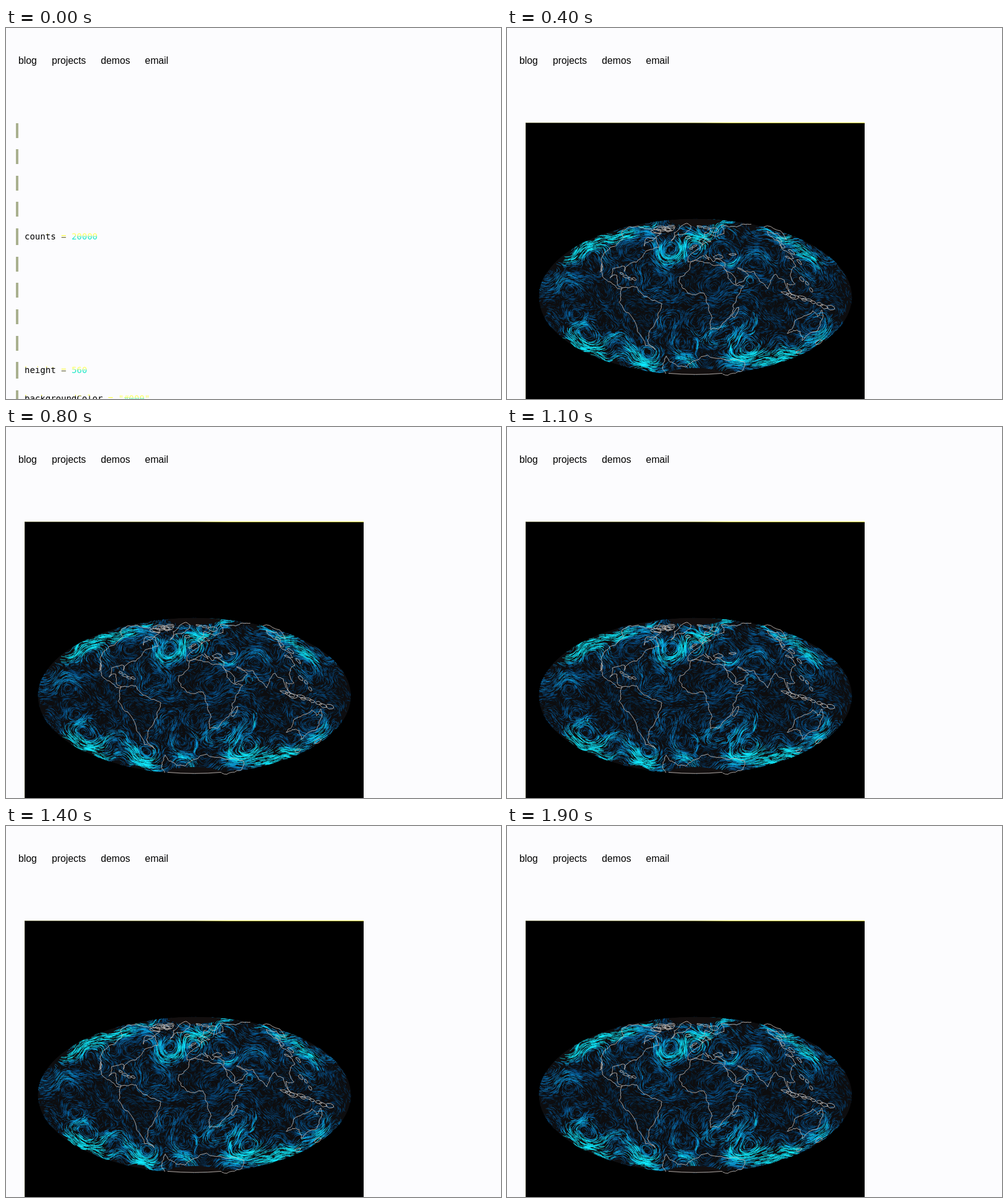
An HTML page with a canvas that plays this animation: 800x600 px, repeating every 2 s.

```html
<!DOCTYPE html>
<html lang="en">
<head>
<meta charset="utf-8">
<title>Wind map</title>
<style>
  html, body { margin: 0; width: 100%; height: 100%; overflow: hidden; background: #fcfcfe; }
  nav { position: absolute; left: 20px; top: 43px; display: flex; gap: 24px;
    font: 15.8px/20px "Liberation Sans", Arial, sans-serif; color: #000; }
  canvas { position: absolute; left: 0; top: 0; }
  .cell { position: absolute; left: 16px; height: 24px; border-left: 4px solid #a9b08f; padding-left: 10px;
    font: 14px/27px "DejaVu Sans Mono", monospace; white-space: pre; }
  .cell.value { height: 27px; }
  .cell span { display: inline-block; height: 27px; color: transparent; background-clip: text; -webkit-background-clip: text; }
  .key { background-image: linear-gradient(#ffff50 8px, #000 10px); }
  .sign { background-image: linear-gradient(#ffff40 13px, #44443a 15px); }
  .literal { background-image: linear-gradient(#ffff60 11px, #20e8c8 14px); }
</style>
</head>
<body>
<nav><span>blog</span><span>projects</span><span>demos</span><span>email</span></nav>
<canvas id="map" width="800" height="600"></canvas>
<div id="cells"></div>
<script>
const LOOP = 2000, STEP = 100;
const CX = 304.5, CY = 435, RX = 253, RY = 126.3, SCALE = RX / Math.sqrt(8);
const canvas = document.getElementById('map');
const ctx = canvas.getContext('2d');
const cells = document.getElementById('cells');

// Notebook cells
const values = { 4: ['counts', '20000'], 9: ['height', '560'], 10: ['backgroundColor', '"#000"'] };
let cellTop = 154;
for (let i = 0; i < 11; i++) {
  const cell = document.createElement('div');
  cell.className = 'cell';
  cell.style.top = Math.floor(cellTop) + 'px';
  cellTop += 42.6;
  if (values[i]) {
    const [key, literal] = values[i];
    cell.classList.add('value');
    cell.innerHTML = `<span class="key">${key}</span><span class="sign"> = </span><span class="literal">${literal}</span>`;
    cellTop += 3.2;
  }
  cells.append(cell);
}

let seed = 7;
function random() {
  seed = (seed + 0x6d2b79f5) | 0;
  let t = Math.imul(seed ^ (seed >>> 15), 1 | seed);
  t = (t + Math.imul(t ^ (t >>> 7), 61 | t)) ^ t;
  return ((t ^ (t >>> 14)) >>> 0) / 4294967296;
}

// Hammer projection
function project(lon, lat) {
  const l = lon * Math.PI / 360, p = lat * Math.PI / 180;
  const z = Math.sqrt(1 + Math.cos(p) * Math.cos(l));
  return [CX + SCALE * Math.sqrt(8) * Math.cos(p) * Math.sin(l) / z,
          CY - SCALE * Math.SQRT2 * Math.sin(p) / z];
}

// Line with a crinkled, coast-like course
function roughLine(path, [x1, y1], [x2, y2], depth = 3) {
  if (!depth || Math.hypot(x2 - x1, y2 - y1) < 3) return path.lineTo(x2, y2);
  const bend = (random() - 0.5) * 0.34;
  const middle = [(x1 + x2) / 2 - (y2 - y1) * bend, (y1 + y2) / 2 + (x2 - x1) * bend];
  roughLine(path, [x1, y1], middle, depth - 1);
  roughLine(path, middle, [x2, y2], depth - 1);
}

const land = new Path2D(), islands = new Path2D();
function coast(keyPoints) {
  const points = keyPoints.split(' ').map(pair => project(...pair.split(',').map(Number)));
  land.moveTo(...points[0]);
  points.slice(1).forEach((point, i) => roughLine(land, points[i], point));
}
function archipelago(from, to, count, size) {
  const start = project(...from), end = project(...to);
  const angle = Math.atan2(end[1] - start[1], end[0] - start[0]);
  for (let i = 0; i < count; i++) {
    const t = count > 1 ? i / (count - 1) : 0.5;
    const x = start[0] + (end[0] - start[0]) * t + (random() - 0.5) * size;
    const y = start[1] + (end[1] - start[1]) * t + (random() - 0.5) * size;
    const long = size * (0.6 + random() * 0.7), wide = long * (0.25 + random() * 0.3);
    for (let j = 0; j <= 8; j++) {
      const a = j * Math.PI / 4, r = j % 8 ? 0.7 + random() * 0.6 : 1;
      const dx = long * r * Math.cos(a), dy = wide * r * Math.sin(a);
      const point = [x + dx * Math.cos(angle) - dy * Math.sin(angle), y + dx * Math.sin(angle) + dy * Math.cos(angle)];
      j ? islands.lineTo(...point) : islands.moveTo(...point);
    }
  }
}
// North America
coast('-78,9 -83,8 -92,14 -105,20 -115,31 -110,23 -121,35 -124,48 -134,57 -152,59 -165,61 -166,68 -125,70 -82,68 -94,60 -80,52 -77,62 -56,52 -70,43 -81,31 -81,25 -84,30 -97,27 -95,18 -88,21 -83,11 -78,9');
// South America
coast('-78,9 -62,10 -50,0 -35,-7 -41,-22 -57,-36 -66,-45 -66,-55 -75,-50 -70,-20 -81,-5 -78,9');
// Africa
coast('33,31 11,36 -6,36 -17,21 -17,15 -8,4 9,4 14,-10 18,-34 27,-34 40,-16 43,0 51,11 43,12 33,30');
// Eurasia
coast('-9,43 -9,37 0,39 10,44 17,39 14,45 23,37 27,40 36,36 33,30 43,13 52,16 59,22 49,30 57,26 67,25 77,8 82,16 91,22 98,16 103,2 100,13 109,12 108,21 121,28 119,38 127,35 129,40 141,52 160,61 157,51 178,64');
coast('178,69 130,72 104,77 68,68 42,66 25,71 6,60 12,56 20,64 28,60 8,54 -2,48 -9,43');
// Australia, Greenland, Antarctica
coast('114,-22 116,-34 131,-31 147,-38 153,-28 142,-11 140,-17 131,-12 114,-22');
coast('-44,60 -54,70 -60,82 -20,80 -25,70 -44,60');
coast('-180,-79 -100,-73 -58,-63 -62,-75 -35,-78 0,-70 55,-66 115,-66 170,-72 180,-80');

archipelago([97, 4], [150, -8], 10, 6);
archipelago([121, 17], [126, 7], 3, 4);
archipelago([131, 33], [143, 53], 4, 6);
archipelago([-84, 22], [-67, 18], 4, 5);
archipelago([-115, 71], [-70, 74], 7, 8);
archipelago([45, -23], [49, -14], 1, 10);
archipelago([167, -46], [176, -37], 2, 5);
archipelago([-8, 53], [-2, 55], 2, 4);
archipelago([-22, 65], [-15, 65], 1, 5);
archipelago([15, 79], [62, 75], 3, 6);
archipelago([33, 43], [51, 42], 2, 8);

const globe = new Path2D();
globe.ellipse(CX, CY, RX, RY, 0, 0, Math.PI * 2);
const southRim = new Path2D();
southRim.ellipse(CX, CY, RX, RY - 1, 0, Math.PI * 0.445, Math.PI * 0.555);

// Polar caps hold no wind data
const caps = new Path2D();
for (const lat of [80, -80]) {
  for (let lon = -180; lon <= 180; lon += 10) {
    const [x, y] = project(lon, lat);
    lon === -180 ? caps.moveTo(x, y) : caps.lineTo(x, y);
  }
  const rim = CY - Math.sign(lat) * RY;
  caps.lineTo(CX + 22, rim);
  caps.lineTo(CX - 22, rim);
  caps.closePath();
}

const storms = [
  { x: 264, y: 360, r: 18, spin: -2.4 },
  { x: 393, y: 407, r: 6, spin: -2.4 },
  { x: 180, y: 490, r: 20, spin: 1 },
  { x: 322, y: 330, r: 14, spin: -2 },
];
// Southern cold fronts, narrow arcs blowing poleward
const fronts = [[145, 488, -0.75], [308, 510, 0.05], [361, 514, -0.2], [402, 478, 0.15]]
  .map(([x, y, tilt]) => ({ x, y, tilt }));
const waves = Array.from({ length: 22 }, () => {
  const angle = random() * Math.PI * 2, k = Math.PI * 2 / (28 + random() * 75);
  return { nx: Math.cos(angle), ny: Math.sin(angle), k, phase: random() * 6.28 };
});

function wind(x, y) {
  const ex = (x - CX) / RX, ey = (y - CY) / RY, radius = Math.hypot(ex, ey) + 0.001;
  const calm = 0.5 + 0.7 * Math.min(1, Math.abs(ey) * 1.8);
  let u = -0.5 * Math.cos(ey * 4.2), v = 0.25 * ex * ey;
  for (const { nx, ny, k, phase } of waves) {
    const a = 0.24 * Math.cos(k * (nx * x + ny * y) + phase);
    u += a * ny;
    v -= a * nx;
  }
  u *= calm;
  v *= calm;

  // Polar jets hug the rim, strongest midway between pole and side
  const rise = ey / radius, run = ex / radius;
  const rim = 14 * rise ** 4 * run ** 2 * Math.exp(-(((radius - 0.93) / 0.1) ** 2));
  const slope = Math.hypot(RX * rise, RY * run);
  u += rim * RX * Math.abs(rise) / slope;
  v -= rim * RY * run * Math.sign(rise) / slope;

  for (const { x: sx, y: sy, r, spin } of storms) {
    const dx = (x - sx) / r, dy = (y - sy) / r;
    const a = 1.5 * spin * Math.exp(-(dx * dx + dy * dy) * 0.9);
    u -= dy * a;
    v += dx * a;
  }
  for (const front of fronts) {
    const dy = y - front.y;
    const dx = x - front.x + front.tilt * dy + dy * dy * 0.012;
    const a = 2.3 * Math.exp(-dx * dx / 9 - (dy / 18) ** 4);
    u -= a * (front.tilt + dy * 0.024);
    v += a;
  }
  return [u, v];
}

// Wind sampled once on a coarse grid
const CELL = 2, COLS = 256, ROWS = 130;
const grid = Array.from({ length: COLS * ROWS }, (_, i) =>
  wind(CX - RX + (i % COLS) * CELL, CY - RY + Math.floor(i / COLS) * CELL));
function sample(x, y) {
  const col = Math.min(COLS - 1, Math.max(0, Math.round((x - CX + RX) / CELL)));
  const row = Math.min(ROWS - 1, Math.max(0, Math.round((y - CY + RY) / CELL)));
  return grid[row * COLS + col];
}

const COLORS = ['#08243c', '#0a3e6c', '#0a5c9c', '#0c84c8', '#0cb4ee', '#10ecff'];
const COUNT = 14000, POINTS = 34, TRAIL = 10;
const particles = COLORS.map(() => []);
for (let i = 0; i < COUNT; i++) {
  const angle = random() * Math.PI * 2, radius = Math.sqrt(random());
  let x = CX + RX * radius * Math.cos(angle), y = CY + RY * radius * Math.sin(angle);
  const exposure = ctx.isPointInPath(land, x, y) ? 1.3 : 2.3;
  const path = new Float32Array(POINTS * 2);
  let total = 0;
  for (let j = 0; j < POINTS; j++) {
    path[j * 2] = x;
    path[j * 2 + 1] = y;
    const [u, v] = sample(x, y), speed = Math.hypot(u, v) + 0.01;
    const stride = Math.min(1, 0.4 + 0.3 * speed) / speed;
    x += u * stride;
    y += v * stride;
    total += speed;
  }
  const level = Math.floor(total / POINTS * exposure + random() * 2 - 0.7);
  particles[Math.min(COLORS.length - 1, Math.max(0, level))].push({ path, phase: Math.floor(random() * (POINTS - TRAIL)) });
}

function drawWind(tick) {
  const length = Math.min(TRAIL, 2 + tick * 3);
  ctx.lineWidth = 0.7;
  particles.forEach((group, level) => {
    ctx.beginPath();
    for (const { path, phase } of group) {
      const first = (phase + tick * 2) % (POINTS - TRAIL);
      ctx.moveTo(path[first * 2], path[first * 2 + 1]);
      for (let j = first + 1; j < first + length; j++) ctx.lineTo(path[j * 2], path[j * 2 + 1]);
    }
    ctx.strokeStyle = COLORS[level];
    ctx.stroke();
  });
}

const topEdge = ctx.createLinearGradient(30, 0, 578, 0);
topEdge.addColorStop(0, '#55552c');
topEdge.addColorStop(0.5, '#8c8c30');
topEdge.addColorStop(0.6, '#d0d020');

function drawMap(tick) {
  ctx.fillStyle = topEdge;
  ctx.fillRect(30, 153, 548, 447);
  ctx.fillStyle = '#000';
  ctx.fillRect(30.5, 154, 547.5, 446);
  ctx.save();
  ctx.clip(globe);
  ctx.fillStyle = '#0d0d0f';
  ctx.fill(globe);
  drawWind(tick);
  ctx.fillStyle = '#130f0f';
  ctx.fill(caps);
  ctx.restore();
  ctx.lineWidth = 0.9;
  ctx.lineJoin = 'round';
  ctx.strokeStyle = '#bdb6b2';
  for (const line of [land, islands, southRim]) ctx.stroke(line);
}

let shown = -1;
function render() {
  const tick = Math.floor(performance.now() % LOOP / STEP);
  if (tick !== shown) {
    shown = tick;
    cells.hidden = tick > 0;
    ctx.clearRect(0, 0, 800, 600);
    if (tick > 0) drawMap(tick);
  }
  requestAnimationFrame(render);
}
render();
</script>
</body>
</html>
```
